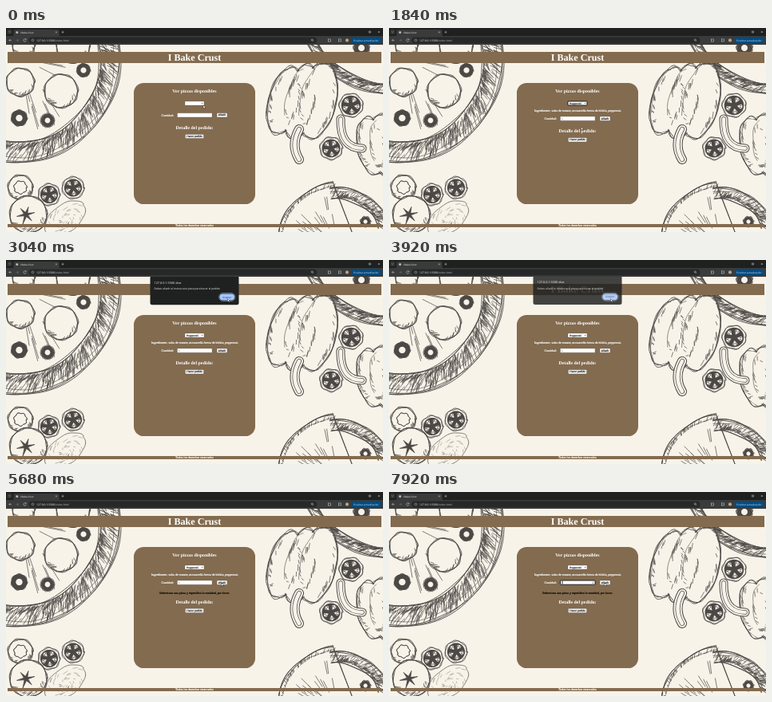
An HTML page that plays this animation: 472x256 px, repeating every 8000 ms.

```html
<!DOCTYPE html>
<html lang="es">
<head>
<meta charset="utf-8">
<title>I Bake Crust</title>
<style>
html, body { margin: 0; width: 100%; height: 100%; overflow: hidden; background: #f8f3e9; }
svg { display: block; width: 100vw; height: 100vh; }
text { text-rendering: geometricPrecision; white-space: pre; }
.serif { font-family: "Liberation Serif", "Times New Roman", serif; }
.sans { font-family: "Liberation Sans", Arial, sans-serif; }
.ui { font-family: "Open Sans", "Noto Sans", sans-serif; }
.mid { text-anchor: middle; }
.bold { font-weight: bold; }
.title { font-size: 5.9px; }
.body { font-size: 3.93px; stroke: #fff; stroke-width: .15; }
.control { font-size: 3.25px; fill: #000; stroke: #000; stroke-width: .1; }
#warning { fill: #000; stroke: #000; }
.box { stroke: #555; stroke-width: .3; }
.box.focus { stroke: #111; stroke-width: .9; }
</style>
</head>
<body>
<svg viewBox="0 0 472 256" preserveAspectRatio="none">
  <rect width="472" height="256" fill="#f8f3e9"/>
  <g id="art" stroke-linecap="round" stroke-linejoin="round"></g>

  <g id="page" fill="#fff">
    <rect x="2" y="30" width="468" height="14" fill="#836b4f"/>
    <text class="serif bold mid" x="236" y="41.2" font-size="12.1">I Bake Crust</text>
    <rect x="2" y="246" width="468" height="4" fill="#836b4f"/>
    <text class="serif mid body" x="236" y="249.2">Todos los derechos reservados</text>
    <rect x="160" y="69" width="152" height="152" rx="12.3" fill="#836b4f"/>
    <text class="serif bold mid title" x="236" y="81">Ver pizzas disponibles</text>

    <rect id="select" class="box" x="224" y="92" width="24" height="5" rx=".5"/>
    <text id="choice" class="sans control" x="226" y="95.7"></text>
    <path d="M244.6 94l1 1 1-1" fill="none" stroke="#111" stroke-width=".5"/>
    <text id="recipe" class="serif mid body" x="236.5" y="105.2">Ingredientes: salsa de tomate, mozzarella fresca de búfala, pepperoni.</text>

    <g id="row">
      <text class="serif body" x="194.5" y="1.2">Cantidad:</text>
      <rect id="field" class="box" x="214.5" y="-2.6" width="43.5" height="5.2" rx=".4"/>
      <text id="amount" class="sans" x="216" y="1.1" font-size="3.25" fill="#666">1</text>
      <path id="spin" d="M254.5 -.4l.8-.9 .8 .9zM254.5 .4l.8 .9 .8-.9z" fill="#555"/>
      <path id="caret" d="M217 -1.9V1.9" stroke="#111" stroke-width=".9"/>
      <rect class="box" x="264" y="-2.6" width="13" height="5.2" rx=".6" fill="#efefef"/>
      <text class="sans mid control" x="270.5" y="1.1">Añadir</text>
    </g>
    <text id="warning" class="serif mid body" x="236" y="128.4">Selecciona una pizza y especifica la cantidad, por favor.</text>
    <g id="order">
      <text class="serif bold mid title" x="236">Detalle del pedido:</text>
      <rect class="box" x="224.5" y="6.4" width="23" height="5.2" rx=".6" fill="#efefef"/>
      <text class="sans mid control" x="236" y="10.1">Hacer pedido</text>
    </g>
    <g id="menu" class="sans" font-size="3.25"></g>
  </g>

  <g id="dialog" class="ui">
    <rect x="180.5" y="20" width="111" height="36.3" rx="2.5" fill="#1f2020"/>
    <text x="185.5" y="29.6" font-size="3.8" fill="#fff">127.0.0.1:5500 dice</text>
    <text x="185.5" y="36.9" font-size="3.27" fill="#fff">Debes añadir al menos una pizza para hacer el pedido</text>
    <rect x="266.5" y="41.5" width="20.5" height="10" rx="5" fill="none" stroke="#a8c7fa" stroke-width=".5"/>
    <rect x="267.4" y="42.4" width="18.7" height="8.2" rx="4.1" fill="#a8c7fa"/>
    <text class="mid" x="276.7" y="47.7" font-size="3.2" fill="#173a70">Aceptar</text>
  </g>

  <g id="browser" class="ui">
    <rect width="472" height="10" fill="#1f2020"/>
    <rect y="10" width="472" height="11" fill="#3a3b3b"/>
    <rect x="1.5" y="1.8" width="6" height="6" rx="1.5" fill="#343535"/>
    <path d="M3.4 4.3l1.1 1.1 1.1-1.1" fill="none" stroke="#ccc" stroke-width=".5"/>
    <path d="M8 10Q9.5 10 9.5 8V3.5Q9.5 2 11 2H65Q66.5 2 66.5 3.5V8Q66.5 10 68 10Z" fill="#3a3b3b"/>
    <circle cx="13.8" cy="5.4" r="1.5" fill="#bbb"/>
    <text x="18" y="6.6" font-size="3" fill="#fff">I Bake Crust</text>
    <rect x="28.5" y="11.5" width="361" height="7.8" rx="3.9" fill="#272828"/>
    <circle cx="33.5" cy="15.4" r="1.4" fill="none" stroke="#ccc" stroke-width=".5"/>
    <text x="38" y="16.8" font-size="3.4" fill="#fff">127.0.0.1:5500<tspan fill="#bbb">/index.html</tspan></text>
    <g fill="none" stroke="#ccc" stroke-width=".55">
      <path d="M62 4.4l2 2m0-2l-2 2M69.5 5.2h3m-1.5-1.5v3"/>
      <path d="M7 15.4H3.8m1.4-1.4l-1.4 1.4 1.4 1.4"/>
      <path d="M12.5 15.4h3.2m-1.4-1.4l1.4 1.4-1.4 1.4" stroke="#777"/>
      <path d="M25 14.5a1.7 1.7 0 1 0 .1 1.6M25.2 13.5v1.3h-1.4"/>
      <circle cx="383.3" cy="15" r="1.1"/><path d="M384.1 15.8l1 1"/>
      <rect x="403.5" y="14" width="3" height="3"/>
      <rect x="416.5" y="13.9" width="3.2" height="3"/>
      <path d="M454.5 4h2v2h-2zM465.8 4l2 2m0-2l-2 2"/>
    </g>
    <circle cx="427" cy="15.4" r="2.1" fill="#b8a18c"/>
    <rect x="432.5" y="11.3" width="37.5" height="8" rx="4" fill="#074b7e"/>
    <text x="435" y="16.6" font-size="3.1" fill="#d3e8fa">Finalizar actualización</text>
  </g>
  <path id="cursor" d="M0 0V4.1L1 3.2 1.7 4.7 2.3 4.4 1.7 3H3Z" fill="#fff" stroke="#111" stroke-width=".4"/>
</svg>

<script>
const LOOP = 8000, INK = '#4c4846', PAPER = '#f8f3e9';
const el = id => document.getElementById(id);
let seed = 17;
const rnd = () => (seed = (seed * 16807) % 2147483647) / 2147483647;
const jit = a => (rnd() * 2 - 1) * a;
const range = (n, f) => Array.from({ length: n }, (_, i) => f(i));

function add(parent, tag, attrs, text) {
  const n = document.createElementNS('http://www.w3.org/2000/svg', tag);
  for (const k in attrs) n.setAttribute(k, attrs[k]);
  if (text) n.textContent = text;
  parent.appendChild(n);
  return n;
}

// ---- ink drawing: everything is built from ovals ----
const draw = (d, width = .9, color = INK, fill = 'none') =>
  add(el('art'), 'path', { d, fill, stroke: color, 'stroke-width': width });
const oval = (x, y, rx, ry = rx, turn = 0) => ({ x, y, rx, ry, turn: turn * Math.PI / 180 });

// Point of an oval at an angle; k = 1 lies on the rim.
function at(o, deg, k = 1) {
  const a = deg * Math.PI / 180, u = o.rx * k * Math.cos(a), v = o.ry * k * Math.sin(a);
  const c = Math.cos(o.turn), s = Math.sin(o.turn);
  return (o.x + u * c - v * s).toFixed(1) + ' ' + (o.y + u * s + v * c).toFixed(1);
}

function fill(o, k = 1, color = PAPER) {
  draw('M' + range(36, i => at(o, i * 10, k)).join('L') + 'Z', 0, 'none', color);
}

// Several slightly wandering passes along the rim.
function rim(o, { k = 1, from = 0, to = 360, passes = 2, wobble = .6, width = .9 } = {}) {
  for (let p = 0; p < passes; p++) {
    const n = Math.ceil((to - from) / 3), base = k + jit(wobble) / o.rx, phase = rnd() * 6;
    draw('M' + range(n + 1, i => at(o, from + (to - from) * i / n,
      base + wobble * Math.sin(phase + i * .35) / o.rx)).join('L'), width);
  }
}

// Loose strokes following a band between two scales.
function shade(o, k0, k1, from, to, count, lean = 5, width = .7) {
  draw(range(count, () => {
    const a = from + (to - from) * rnd(), k = k0 + (k1 - k0) * rnd() * .6;
    return 'M' + at(o, a, k) + 'L' + at(o, a + lean * (.5 + rnd()), k + (k1 - k0) * .4);
  }).join(''), width);
}

function ball(o, count = 16) {
  fill(o);
  rim(o, { passes: 3 });
  shade(o, .72, 1, 10, 150, count, 9);
}

function olive(x, y, r) {
  const o = oval(x, y, r);
  fill(o, 1, INK);
  fill(o, .42);
  rim(o);
  rim(o, { k: .7, from: 200, to: 280, passes: 1, width: .4 });
}

function tomato(x, y, r) {
  const o = oval(x, y, r);
  fill(o);
  rim(o);
  fill(o, .82, INK);
  for (let a = 10; a < 360; a += 72) {
    draw(`M${at(o, a, .25)}L${at(o, a - 20, .62)}Q${at(o, a, .85)} ${at(o, a + 20, .62)}Z`, .3, INK, PAPER);
    draw(`M${at(o, a - 8, .5)}L${at(o, a - 9, .6)}M${at(o, a + 8, .5)}L${at(o, a + 9, .6)}`, 1);
  }
}

// Baked edge between scale k and the rim.
function crust(o, k, from, to) {
  const span = { from, to }, count = (to - from) * o.rx / 75;
  rim(o, { ...span, passes: 3, wobble: 1 });
  rim(o, { ...span, k: k + (1 - k) * .7, passes: 1, wobble: 1.5, width: .6 });
  rim(o, { ...span, k, passes: 3, wobble: 1.2 });
  shade(o, k, 1, from, to, count, 3);
  shade(o, k, k + (1 - k) * .4, from, to, count, 3);
}

// Merged lobes: only the outer outline and a few inner folds stay visible.
function pepper(lobes) {
  lobes.forEach(o => rim(o, { passes: 3 }));
  lobes.forEach(o => fill(o, 1 - 1 / o.rx));
  lobes.forEach(o => {
    shade(o, .72, .95, 120, 235, 14, 8);
    shade(o, .75, .95, -50, 60, 12, 8);
    rim(o, { from: 150, to: 250, k: .93, passes: 1, width: .6 });
  });
}

function stalk(d, width) {
  draw(d, width);
  draw(d, width - 2, PAPER);
  for (const k of [.25, .5]) draw(d, width * k, INK);
  draw(d, width * .38, PAPER);
}

function pizza() {
  const o = oval(12, 38, 131);
  crust(o, .81, -14, 98);
  shade(o, .2, .75, 5, 90, 14, 2);
  ball(oval(84, 23, 21));
  ball(oval(22, 22, 14));
  ball(oval(18, 68, 17.5));
  ball(oval(69, 79, 21));
  olive(97, 53, 8.5);
  olive(16.5, 113, 10);
  olive(52, 116, 8);
  crust(oval(478, -30, 112), .89, 92, 156);
  olive(445, 25, 9.5);
}

function slices() {
  const left = oval(418, 272, 78), right = oval(415, 270, 70);
  fill(left);
  crust(left, .82, 190, 264);
  fill(right);
  crust(right, .8, 262, 340);
  for (const k of [1, .96]) draw(`M${at(left, 264, k)}L${437 - k * 4} 256`);
  shade(left, .3, .8, 195, 255, 18, 3);
  olive(450, 243, 6);
}

function vegetables() {
  const mushroom = oval(18, 200, 15.5), potato = oval(74, 239, 29, 17, -38), big = oval(28, 234, 23);
  ball(mushroom);
  rim(mushroom, { k: .52 });
  fill(potato);
  rim(potato, { passes: 1, width: .7 });
  for (let k = .15; k < .95; k += .2) shade(potato, k, k + .2, 0, 360, 12, 14, .35);
  tomato(54, 209, 13.5);
  tomato(84, 200.5, 13.5);
  ball(big, 26);
  const leaf = oval(25, 234, 11);
  draw('M' + range(12, i => at(leaf, i * 30 - 12, i % 2 ? .25 : 1 + jit(.2))).join('L') + 'Z', .7, INK, INK);

  pepper([oval(349, 91, 20, 43, 15), oval(390, 91, 23, 48, 12), oval(369, 92, 20, 47, 13)]);
  stalk('M367 127Q356 147 367 165', 12);
  pepper([oval(458, 148, 18, 36, -10), oval(474, 147, 20, 39, -8)]);
  stalk('M419 114Q418 151 446 151', 11);
  tomato(432, 97, 15);
  tomato(407, 151, 14);
}

pizza();
slices();
vegetables();

// ---- drop-down list ----
const MENU_Y = 97.3, ITEM = 3.6, options = ['Margarita', 'Hawaiana', 'Pepperoni'];
const items = options.map((name, i) => {
  const y = MENU_Y + i * ITEM;
  return {
    bar: add(el('menu'), 'rect', { x: 224, y, width: 24, height: ITEM }),
    label: add(el('menu'), 'text', { x: 226, y: y + 2.8 }, name)
  };
});

// ---- motion ----
const select = [247, 97], option = [243, 107], order = [238, 141];
const accept = [277.5, 48.5], addButton = [269.5, 114], field = [232, 113.5];
const legs = [
  { from: 320, to: 1440, spot: option },
  { from: 1440, to: 2240, spot: order },
  { from: 2560, to: 3040, spot: accept },
  { from: 4480, to: 5280, spot: addButton },
  { from: 6080, to: 6640, spot: field },
  { from: 6880, to: 7600, spot: addButton }
];
const progress = (t, from, to) => Math.max(0, Math.min(1, (t - from) / (to - from)));
const ease = k => k * k * (3 - 2 * k);
const show = (id, on) => el(id).setAttribute('visibility', on ? 'visible' : 'hidden');
const move = (id, x, y) => el(id).setAttribute('transform', `translate(${x} ${y})`);
const focus = (id, on) => el(id).classList.toggle('focus', on);

const pointer = t => legs.reduce((pos, { from, to, spot }) => {
  const k = ease(progress(t, from, to));
  return pos.map((v, i) => v + (spot[i] - v) * k);
}, select);

function render(t) {
  const [x, y] = pointer(t);
  const open = t >= 320 && t < 1440, chosen = t >= 1440, warned = t >= 5440, typing = t >= 6720;
  move('cursor', x, y);

  show('menu', open);
  const hover = Math.max(0, Math.min(2, Math.floor((y - MENU_Y) / ITEM)));
  items.forEach(({ bar, label }, i) => {
    bar.setAttribute('fill', i === hover ? '#1967d2' : '#fff');
    label.setAttribute('fill', i === hover ? '#fff' : '#111');
  });

  el('choice').textContent = chosen ? 'Pepperoni' : '';
  focus('select', t >= 320 && t < 2400);
  focus('field', typing);
  show('recipe', chosen);
  show('warning', warned);
  show('amount', chosen && !typing);
  show('spin', typing);
  show('caret', typing && Math.floor((t + 30) / 530) % 2 === 1);
  move('row', 0, chosen ? 113.6 : 109.3);
  move('order', 0, warned ? 139.8 : chosen ? 131.3 : 127);

  const enter = progress(t, 2500, 2700), leave = progress(t, 3890, 4080);
  el('dialog').setAttribute('opacity', enter * (1 - leave));
  move('dialog', 0, -4 * (1 - enter) - 2 * leave);
}

function tick() {
  render(performance.now() % LOOP);
  requestAnimationFrame(tick);
}
tick();
</script>
</body>
</html>
```
